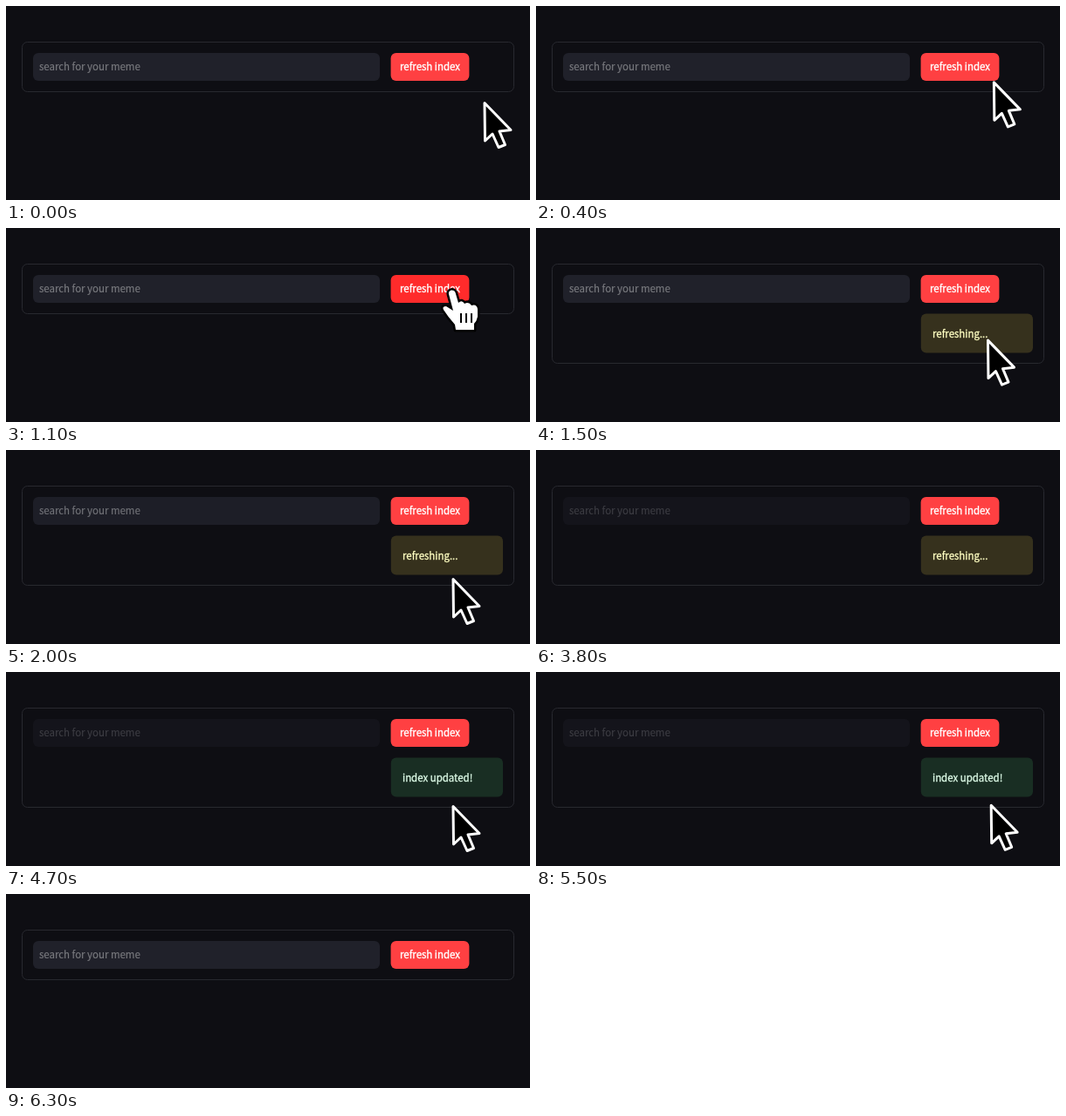
Recreate the animation shown at these times as an HTML page with a canvas. Size 600 px wide and 223 px high, loop 6400 ms.

```html
<!DOCTYPE html>
<html lang="en">
<head>
<meta charset="utf-8">
<title>Refresh index</title>
<style>
  html, body { margin: 0; width: 100%; height: 100%; overflow: hidden; background: #0e0e13; }
  canvas { display: block; width: 600px; height: 223px; }
</style>
</head>
<body>
<canvas id="stage"></canvas>
<script>
const W = 600, H = 223, LOOP = 6400, STEP = 100;
const FONT = '11.45px "Noto Sans CJK JP", "Noto Sans CJK SC", "Noto Sans CJK", "Open Sans", sans-serif';
const canvas = document.getElementById('stage');
const ctx = canvas.getContext('2d');
const dpr = window.devicePixelRatio || 1;
canvas.width = W * dpr;
canvas.height = H * dpr;

const arrow = new Path2D('M0 .5L.5 44L9 36L16 51.5L23.5 48.5L17 33L30 31.5Z');
const hand = new Path2D(
  'M-2 4C-3 -1 4 -2 5.5 2L9 14Q13 10 16 15Q21 12 24 17Q30 15 31 21V30' +
  'Q30 35 27 38V45H6L5 39Q-3 30 -8 22Q-10 18 -5 18L3 23Z');

const mix = (a, b, u) => a + (b - a) * u;
const ramp = (t, from, to) => Math.max(0, Math.min(1, (t - from) / (to - from)));
function ease(t, from, to) {
  const u = ramp(t, from, to);
  return u * u * (3 - 2 * u);
}

// Glide to the button, drop below the alert and drift; twice leave to the right
function pointer(t) {
  const come = ease(t, 0, 700), drop = ease(t, 1100, 1700);
  const away = ease(t, 3550, 3800) - ease(t, 4100, 4600) + ease(t, 5700, 6000);
  const driftX = 517 - 5 * Math.cos((t - 2000) / 1350 * 2 * Math.PI);
  const driftY = 151 - 3 * Math.cos((t - 2000) / 2700 * Math.PI);
  return [
    mix(mix(548, 509, come), driftX, drop) + 110 * away,
    mix(mix(111, 72, come), driftY, drop) + 10 * away
  ];
}

function box(x, y, w, h, fill, line) {
  ctx.beginPath();
  ctx.roundRect(x, y, w, h, 6);
  if (fill) { ctx.fillStyle = fill; ctx.fill(); }
  if (line) { ctx.strokeStyle = line; ctx.lineWidth = 1; ctx.stroke(); }
}

// A hairline in the same colour gives the text a little more weight
function label(text, x, y, color, weight) {
  ctx.fillStyle = ctx.strokeStyle = color;
  ctx.lineWidth = weight;
  ctx.fillText(text, x, y);
  ctx.strokeText(text, x, y);
}

function drawPointer(x, y, isHand) {
  ctx.save();
  ctx.translate(x, y);
  ctx.lineJoin = 'round';
  const shape = isHand ? hand : arrow;
  if (isHand) {
    ctx.strokeStyle = '#000';
    ctx.lineWidth = 5;
    ctx.stroke(shape);
    ctx.fillStyle = '#fff';
    ctx.fill(shape);
    ctx.fillStyle = '#000';
    for (let i = 0; i < 3; i++) ctx.fillRect(11 + 6 * i, 26, 2, 11);
  } else {
    ctx.fillStyle = '#000';
    ctx.fill(shape);
    ctx.strokeStyle = '#fff';
    ctx.lineWidth = 3;
    ctx.stroke(shape);
  }
  ctx.restore();
}

function draw(t) {
  const open = t >= 1200 && t < 6300;
  const done = t >= 4200;
  const [x, y] = pointer(t);
  const over = x > 441 && x < 531 && y > 54 && y < 86;

  ctx.setTransform(dpr, 0, 0, dpr, 0, 0);
  ctx.font = FONT;
  ctx.lineJoin = 'round';
  ctx.fillStyle = '#0e0e13';
  ctx.fillRect(0, 0, W, H);

  box(18.5, 41.5, 563, open ? 114 : 57, null, '#28292f');

  const fade = open ? ramp(t, 1650, 2650) : 0;
  ctx.globalAlpha = 1 - 0.64 * fade ** 1.8;
  box(31, 54, 397, 32, '#20212a');
  label('search for your meme', 38, 74, '#77787d', 0.2);
  ctx.globalAlpha = 1;

  box(440.6, 54, 89.8, 32, over ? '#ff2b2b' : '#ff4042');
  label('refresh index', 451, 74, '#fff', 0.35);

  if (open) {
    box(440.8, 98.5, 128.2, 45, done ? '#192e23' : '#36311d');
    label(done ? 'index updated!' : 'refreshing...', 454, 125.5, done ? '#dffde9' : '#ffffc2', 0.3);
  }
  if (x < 605) drawPointer(x, y, over);
}

const start = performance.now();
function tick() {
  const t = (performance.now() - start) % LOOP;
  draw(Math.floor(t / STEP) * STEP);
  requestAnimationFrame(tick);
}
tick();
</script>
</body>
</html>
```
